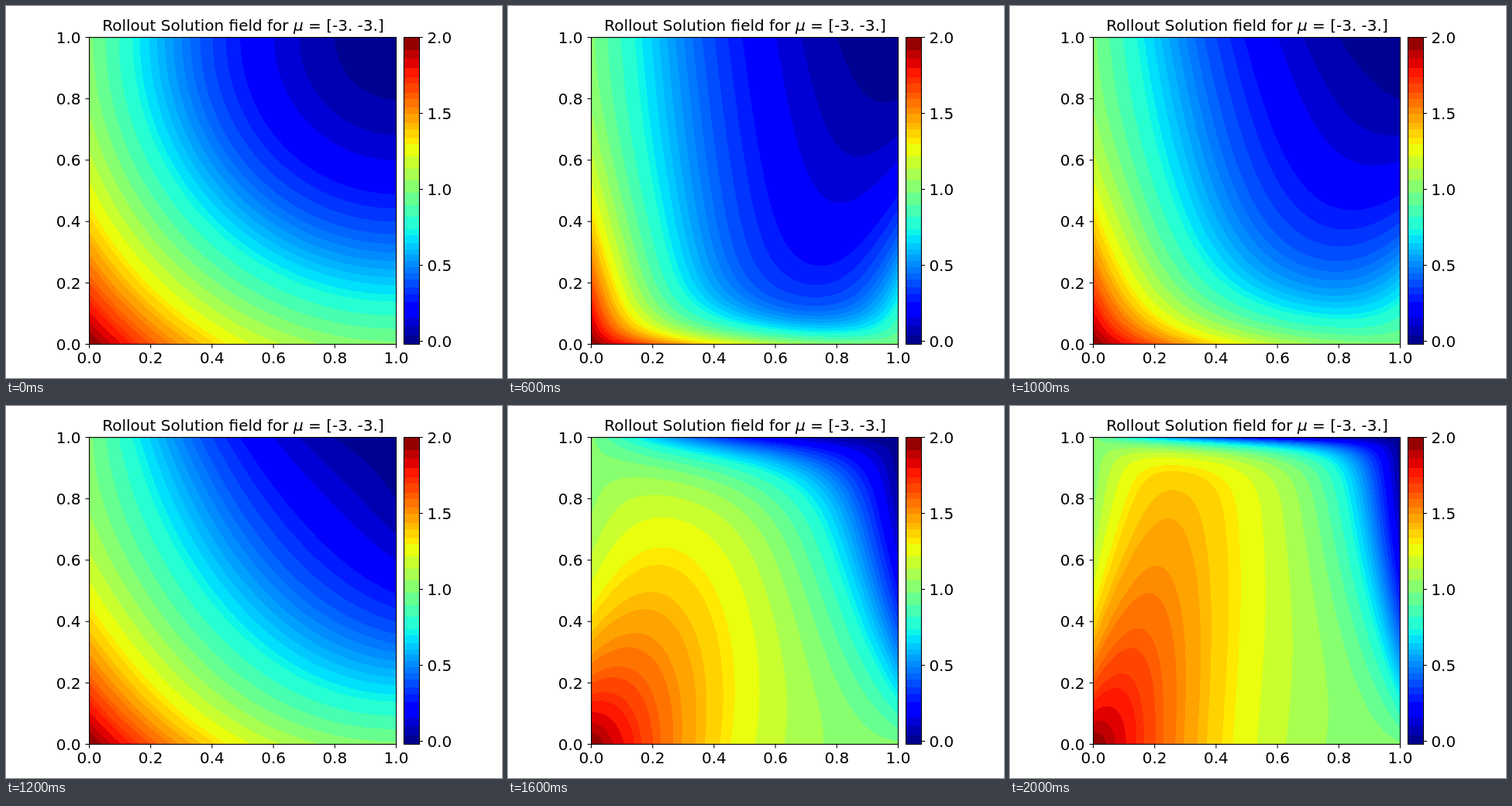
Write an HTML page with a canvas that moves like this. It is 640 px wide and 480 px high and loops after 2.1 s.

```html
<!DOCTYPE html>
<html lang="en">
<head>
<meta charset="utf-8">
<title>Rollout Solution field</title>
<style>
  html, body { margin: 0; width: 100%; height: 100%; overflow: hidden; background: #fff; }
  canvas, svg { position: absolute; left: 0; top: 0; }
  text { font: 20px "DejaVu Sans", sans-serif; fill: #000; }
</style>
</head>
<body>
<canvas id="plot" width="640" height="480"></canvas>
<svg id="axes" width="640" height="480" fill="none" stroke="#000" stroke-width="1.1">
  <rect x="107.5" y="40.5" width="396" height="396"/>
  <rect x="513.5" y="40.5" width="20" height="396"/>
  <text x="306" y="32" text-anchor="middle" stroke="none">Rollout Solution field for <tspan font-style="italic">μ</tspan> = [-3. -3.]</text>
</svg>
<script>
const N = 396, LEFT = 107.5, TOP = 40.5, BOTTOM = TOP + N;
const LOW = -0.02, HIGH = 2, STEP = 100, FRAMES = 21, MODES = 20;
const ctx = document.getElementById('plot').getContext('2d');
const axes = document.getElementById('axes');

// Axis ticks and labels
function label(x, y, value, anchor, dx, dy) {
  axes.insertAdjacentHTML('beforeend',
    `<path d="M${x} ${y}l${dx} ${dy}"/>` +
    `<text x="${x + 2.2 * dx}" y="${y + 7.3 + 3.4 * dy}" text-anchor="${anchor}" stroke="none">${value.toFixed(1)}</text>`);
}
for (let i = 0; i <= 5; i++) {
  label(LEFT + N * i / 5, BOTTOM, i / 5, 'middle', 0, 5);
  label(LEFT, BOTTOM - N * i / 5, i / 5, 'end', -5, 0);
}
for (let v = 0; v <= 2; v += 0.5) {
  label(533.5, BOTTOM - N * (v - LOW) / (HIGH - LOW), v, 'start', 4.5, 0);
}

// Banded jet colours
const levels = [LOW, .04, .1, .16, .26, .31, .36, .41, .45, .49, .53, .57, .61, .65, .7, .74,
  .82, .9, .98, 1.06, 1.14, 1.22, 1.3, 1.34, 1.4, 1.44, 1.5, 1.54, 1.6, 1.64, 1.7, 1.74,
  1.8, 1.86, 1.92, HIGH];
const clamp = v => Math.max(0, Math.min(1, v));
function jet(t) {
  const r = t < .7 ? clamp((t - .35) / .31) : 1 - .5 * clamp((t - .89) / .11);
  const g = t < .5 ? clamp((t - .125) / .25) : clamp((.91 - t) / .27);
  const b = t < .2 ? .5 + .5 * clamp(t / .11) : clamp((.65 - t) / .31);
  return [r, g, b].map(c => Math.round(c * 255));
}
const palette = [];
for (let i = 0, band = 1; i <= 2020; i++) {
  const u = LOW + i / 1000;
  while (band < levels.length - 1 && u >= levels[band]) band++;
  const mid = (levels[band - 1] + levels[band]) / 2;
  const [r, g, b] = jet((mid - LOW) / (HIGH - LOW));
  palette.push((255 << 24 | b << 16 | g << 8 | r) >>> 0);
}
const colour = u => palette[Math.max(0, Math.min(2020, Math.round((u - LOW) * 1000)))];

const image = ctx.createImageData(N, N);
const pixels = new Uint32Array(image.data.buffer);
const bar = ctx.createImageData(20, N);
new Uint32Array(bar.data.buffer).forEach((_, i, a) => {
  a[i] = colour(HIGH - (Math.floor(i / 20) + .5) / N * (HIGH - LOW));
});
ctx.putImageData(bar, 514, 41);

const sines = Array.from({ length: MODES }, (_, m) =>
  Float64Array.from({ length: N }, (_, i) => Math.sin((2 * m + 1) * Math.PI * (i + .5) / N)));

// Vertical profile of one sine mode for drift p, zero at y = 0 and y = 1
function profile(n, p) {
  const k2 = (n * Math.PI) ** 2, s = 4 / (n * Math.PI);
  const B = -2 * p * s / k2, A = (s * (4 + 2 * p) - p * B) / k2;
  const root = Math.sqrt(p * p + 4 * k2), r1 = (p + root) / 2, r2 = (p - root) / 2;
  const e1 = Math.exp(-r1), e2 = Math.exp(r2);
  const c1 = (e2 * A - A - B) / (1 - e1 * e2), c2 = -A - e1 * c1;
  return y => A + B * y + c1 * Math.exp(r1 * (y - 1)) + c2 * Math.exp(r2 * y);
}

// Advection-diffusion field with boundary values (x-1)^2 + (y-1)^2
function drawField(k) {
  const p = -21.3 + .8 * k + .039 * k ** 2 + .00185 * k ** 3;
  const modes = k ? sines.map((_, m) => profile(2 * m + 1, p)) : [];
  const row = new Float64Array(N);
  for (let j = 0; j < N; j++) {
    const y = 1 - (j + .5) / N;
    for (let i = 0; i < N; i++) row[i] = (1 - (i + .5) / N) ** 2 + (1 - y) ** 2;
    modes.forEach((f, m) => {
      const amp = f(y), wave = sines[m];
      for (let i = 0; i < N; i++) row[i] += amp * wave[i];
    });
    for (let i = 0; i < N; i++) pixels[j * N + i] = colour(row[i]);
  }
  ctx.putImageData(image, 108, 41);
}

let shown = -1;
const start = performance.now();
function tick() {
  const k = Math.floor((performance.now() - start) / STEP) % FRAMES;
  if (k !== shown) drawField(shown = k);
  requestAnimationFrame(tick);
}
tick();
</script>
</body>
</html>
```
